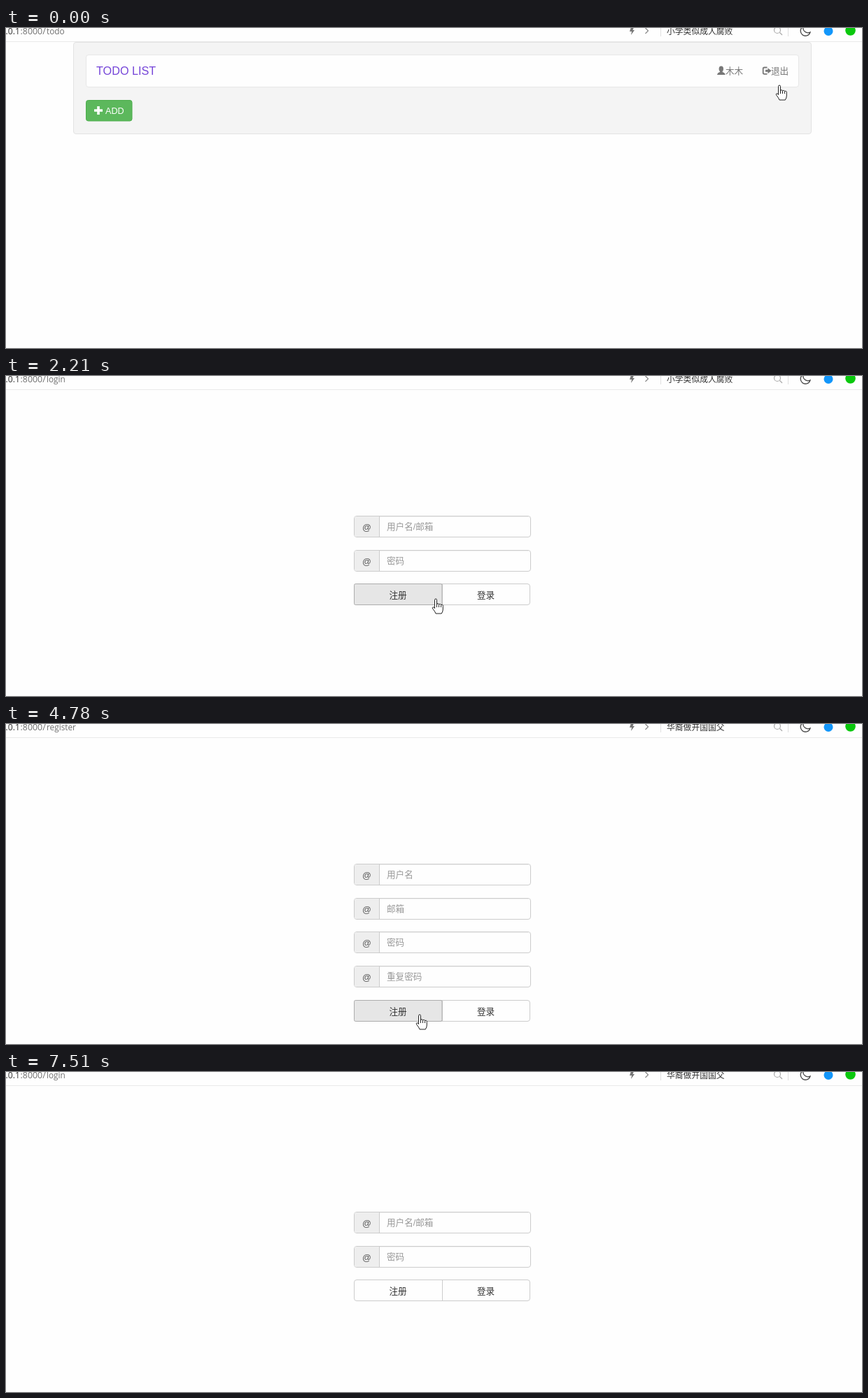
Animation of 1223 by 458 pixels, one loop 8.63 s. Source, as an HTML page:

```html
<!DOCTYPE html>
<html lang="zh-CN">
<head>
<meta charset="utf-8">
<style>
html, body { margin: 0; width: 100%; height: 100%; overflow: hidden; background: #fefefe; }
svg { display: block; width: 1223px; height: 458px; }
text { font: 12.6px "Liberation Sans", "Noto Sans CJK SC", "Noto Sans CJK", sans-serif; white-space: pre; }
.url { font-family: "Open Sans", sans-serif; }
</style>
</head>
<body>
<svg id="stage" viewBox="0 0 1223 458"></svg>
<script>
const LOOP = 8630;
const stage = document.getElementById('stage');

// Bursts of movement: first change, last change, number of changes.
const bursts = [
  [0, 0, 1], [120, 240, 2], [1080, 1080, 1], [1200, 1350, 2], [1660, 2660, 8], [2810, 3780, 8],
  [3930, 4470, 5], [4780, 5720, 8], [5870, 5870, 1], [6280, 7210, 7], [7360, 7510, 2]
];

// Pointer path: time, x, y and the shape used from then on.
const path = [
  [0, 1106, 82, 'hand'], [240, 1105, 64, 'hand'], [1080, 1105, 64, 'arrow'], [1350, 1105, 64, 'arrow'],
  [1660, 1030, 105, 'arrow'], [1945, 735, 270, 'arrow'], [2088, 660, 309, 'hand'], [2231, 615, 319, 'hand'],
  [2660, 600, 325, 'hand'], [2810, 600, 322, 'hand'], [3087, 602, 318, 'beam'], [3780, 650, 358, 'beam'],
  [3930, 645, 368, 'beam'], [4065, 625, 385, 'arrow'], [4200, 602, 405, 'hand'], [4470, 594, 414, 'hand'],
  [4780, 592, 416, 'hand'], [5050, 600, 415, 'hand'], [5585, 664, 407, 'hand'], [5870, 664, 407, 'hand'],
  [6280, 662, 402, 'arrow'], [6680, 640, 380, 'arrow'], [7210, 682, 385, 'arrow'], [7360, 997, 436, 'arrow'],
  [7510, 997, 436, 'none']
];

const cursors = {
  hand: `<path d="M-2.500 13.500V1.500a1.500 1.500 0 0 1 3 0V8a1.500 1.500 0 0 1 3 .5a1.500 1.500 0 0 1 3 .8a1.400 1.400 0 0 1 2.800 .9V15q0 3-2 6H-1q-1-3-4-6.500q-1.500-2.200 0-2.800q1.200-.4 2.500 1.800z" fill="#fff" stroke="#222"/>
    <path d="M.5 8v4M3.500 8.500V12M6.500 9.500V12" stroke="#222"/>`,
  arrow: '<path d="M.5 .5V14l3-2.800 2.200 5.300 2-.9-2.200-5.100h4.200z" fill="#fff" stroke="#222"/>',
  beam: '<path d="M-3-7h2.300L0-6.300.7-7H3M0-6.300V6.300M-3 7h2.300L0 6.300.7 7H3" fill="none" stroke="#222"/>',
  none: ''
};

const text = (x, y, content, fill, extra = '') => `<text x="${x}" y="${y}" fill="${fill}" ${extra}>${content}</text>`;
const box = (x, y, w, h, fill, stroke, r = 3.5) =>
  `<rect x="${x}" y="${y}" width="${w}" height="${h}" rx="${r}" fill="${fill}" stroke="${stroke}"/>`;
const centered = 'text-anchor="middle"';

function snapTime(t) {
  const [start, end, count] = bursts.findLast(b => b[0] <= t);
  const step = (end - start) / (count - 1 || 1);
  const index = Math.min(count - 1, Math.floor((t - start) / (step || 1) + .2));
  return start + index * step;
}

function pointerAt(t) {
  const i = path.findLastIndex(p => p[0] <= t);
  const [t0, x0, y0, shape] = path[i];
  const [t1, x1, y1] = path[i + 1] || [t0 + 1, x0, y0];
  const k = (t - t0) / (t1 - t0);
  return { x: Math.round(x0 + (x1 - x0) * k), y: Math.round(y0 + (y1 - y0) * k), shape };
}

function browserBar(page, headline, headlineColor) {
  return `<path d="M0 19.5H1223" stroke="#e9e9e9"/>
    ${text(20, 9, '127.0.0.1', '#333', 'class="url" text-anchor="end" style="font-size:12.2px"')}
    ${text(20.5, 9, ':8000/', '#707070', 'class="url" style="font-size:12.4px"')}
    ${text(58, 9, page, '#707070', 'class="url" style="font-size:11.8px"')}
    <path d="M893-1h4l-1.500 4H898l-5 7 1-5h-3z" fill="#777"/>
    <path d="M913.500 0l4 4-4 4" fill="none" stroke="#888" stroke-width="1.2"/>
    <path d="M935.500 0V12M1117.500 0V12" stroke="#e0e0e0"/>
    ${text(944, 8.6, headline, headlineColor, 'style="font-size:11.8px"')}
    <g fill="none" stroke="#aaa" stroke-width="1.2"><circle cx="1102" cy="3" r="4.500"/><path d="M1105.500 6.500l3.500 3.500"/></g>
    <path d="M1139-2a7 7 0 1 0 10 8a7 7 0 0 1-10-8z" fill="none" stroke="#444" stroke-width="1.3"/>
    <circle cx="1175" cy="4.500" r="6.500" fill="#1296fa"/>
    <circle cx="1206.500" cy="3.500" r="7.300" fill="#09c80c"/>`;
}

function todoPage(hovered, clicked) {
  const link = hovered ? '#333' : '#777';
  return `${box(96.5, 20.5, 1054, 131, '#f4f4f4', '#e3e3e3')}
    ${box(114.5, 38.5, 1018, 46, '#fefefe', '#e7e7e7')}
    ${clicked ? '<path d="M1099 39h33v45h-52V68h19z" fill="#f8f8f8"/>' : ''}
    ${text(129, 67, 'TODO LIST', '#7545d8', 'style="font-size:16.2px"')}
    <g fill="#777"><ellipse cx="1021.800" cy="58.500" rx="3.200" ry="4"/>
      <path d="M1016 67q0-2.500 4-4v-2h3.600v2q4 1.500 4 4z"/></g>
    ${text(1028, 66, '木木', '#777')}
    <path d="M1087.500 56.500h-4q-1.800 0-1.800 1.800v5.800q0 1.800 1.800 1.800h4" fill="none" stroke="${link}" stroke-width="1.800"/>
    <path d="M1085 59.800h3.500v-2.500l5 4-5 4v-2.500H1085z" fill="${link}"/>
    ${text(1093, 66, '退出', link)}
    ${box(114.5, 103.5, 65.5, 29.5, '#5cb85c', '#4cae4c', 3)}
    <path d="M132 112v12M126 118h12" stroke="#fff" stroke-width="3.600"/>
    ${text(142, 122.5, 'ADD', '#fff')}`;
}

function field(y, label) {
  return `${box(497.5, y, 252, 30, '#fefefe', '#ccc')}
    <path d="M533.500 ${y + .5}H500.500q-2.500 0-2.500 2.500v24q0 2.500 2.500 2.500h33z" fill="#eee"/>
    <path d="M533.500 ${y}v30" stroke="#ccc"/><path d="M534 ${y + 1}H748" stroke="#f1f1f1"/>
    ${text(515.5, y + 20, '@', '#555', centered)}${text(544, y + 19.5, label, '#999')}`;
}

function button(x, y, label, state) {
  const [fill, stroke] = { idle: ['none', 'none'], hover: ['#e6e6e6', '#adadad'], active: ['#d4d4d4', '#8c8c8c'] }[state];
  const shade = state === 'active'
    ? ['#bcbcbc', '#c2c2c2', '#cacaca'].map((c, i) => `<path d="M${x + 1} ${y + 1 + i}h124" stroke="${c}"/>`).join('') : '';
  return box(x, y, 125.5, 30, fill, stroke, 2) + shade + text(x + 62.5, y + 20, label, '#333', centered);
}

function formPage(labels, pointer, pressed) {
  const rowY = i => Math.round(200 + i * 48.7) + .5;
  const y = rowY(labels.length);
  const stateOf = x => {
    const over = pointer.shape === 'hand' && pointer.x >= x && pointer.x < x + 125 && pointer.y >= y && pointer.y <= y + 30;
    return !over ? 'idle' : pressed ? 'active' : 'hover';
  };
  return labels.map((label, i) => field(rowY(i), label)).join('') +
    box(497.5, y, 251, 30, '#fefefe', '#ccc') + `<path d="M623.500 ${y}v30" stroke="#ccc"/>` +
    button(497.5, y, '注册', stateOf(497.5)) + button(623, y, '登录', stateOf(623));
}

function render(t) {
  const pointer = pointerAt(t);
  const page = t < 1200 ? 'todo' : t < 3080 || t >= 5870 ? 'login' : 'register';
  const pressed = t >= 2810 && t < 3080 || t >= 5700 && t < 5870;
  const headline = t < 3490 ? '小学类似成人腐败' : '华裔做开国国父';
  const headlineColor = t >= 3490 && t < 3930 ? '#2160b0' : '#333';
  const labels = page === 'login' ? ['用户名/邮箱', '密码'] : ['用户名', '邮箱', '密码', '重复密码'];
  stage.innerHTML = browserBar(page, headline, headlineColor) +
    (page === 'todo' ? todoPage(t >= 120, t >= 1080) : formPage(labels, pointer, pressed)) +
    `<g transform="translate(${pointer.x} ${pointer.y})">${cursors[pointer.shape]}</g>`;
}

const began = performance.now();
let shown = -1;
function tick() {
  const t = snapTime((performance.now() - began) % LOOP);
  if (t !== shown) render(shown = t);
  requestAnimationFrame(tick);
}
tick();
</script>
</body>
</html>
```
